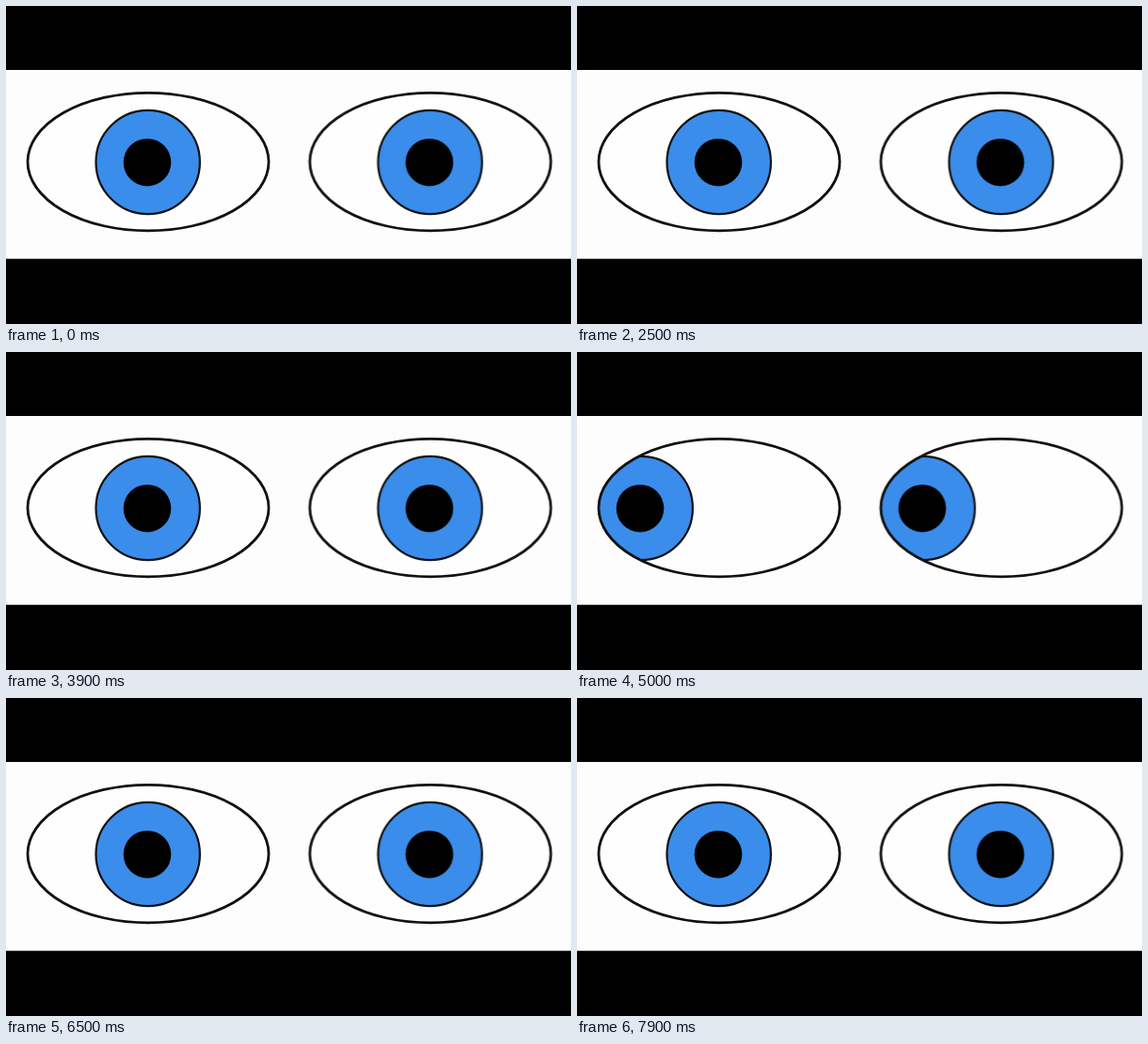
Animation, 600 px wide and 338 px high, one loop 8 s. Source, as an HTML page:

```html
<!DOCTYPE html>
<html lang="en">
<head>
<meta charset="utf-8">
<title>Darting eyes</title>
<style>
  html, body { margin: 0; width: 100%; height: 100%; overflow: hidden; background: #000; }
  svg { display: block; width: 600px; height: 338px; }
  .outline { fill: none; stroke: #111; stroke-width: 2.8; }
  .iris { fill: #3a8dea; stroke: #111; stroke-width: 2.2; }
</style>
</head>
<body>
<svg viewBox="0 0 600 338">
  <defs>
    <ellipse id="lid" cx="151" cy="165.6" rx="128" ry="73.3"/>
    <clipPath id="opening"><use href="#lid"/></clipPath>
  </defs>
  <rect y="68" width="600" height="200.7" fill="#fdfdfd"/>
  <g id="eyes"></g>
</svg>
<script>
const LOOP = 8000;
const STEP = 100;
const EYE_GAP = 299.6;

const POSES = {
  C: [0, 0],
  L: [-83, 0],
  R: [83, 0],
  U: [0, -13],
  D: [0, 13]
};

// Bursts of quick glances: start time and one pose per step; the last pose is held.
const BURSTS = [
  [0, 'CLCUCDCR'],
  [1000, 'CLCUCDCRC'],
  [2400, 'RCLCUCDCR'],
  [3900, 'CUCDCRCL'],
  [5200, 'RCLCUCDCR'],
  [6300, 'CLCUCDCRC']
];

document.getElementById('eyes').innerHTML = [0, EYE_GAP].map(x => `
  <g transform="translate(${x} 0)">
    <use href="#lid" fill="#fefefe"/>
    <g clip-path="url(#opening)">
      <g class="gaze">
        <circle class="iris" cx="150.7" cy="166" r="55.2"/>
        <circle cx="150" cy="166.2" r="25.3"/>
      </g>
    </g>
    <use href="#lid" class="outline"/>
  </g>`).join('');

const keyframe = (time, pose) => {
  const [x, y] = POSES[pose];
  return {
    offset: time / LOOP,
    transform: `translate(${x}px, ${y}px)`,
    easing: 'steps(1, end)'
  };
};

const keyframes = BURSTS.flatMap(([start, poses]) =>
  [...poses].map((pose, i) => keyframe(start + i * STEP, pose)));
keyframes.push(keyframe(LOOP, 'C'));

for (const gaze of document.querySelectorAll('.gaze')) {
  gaze.animate(keyframes, { duration: LOOP, iterations: Infinity });
}
</script>
</body>
</html>
```
